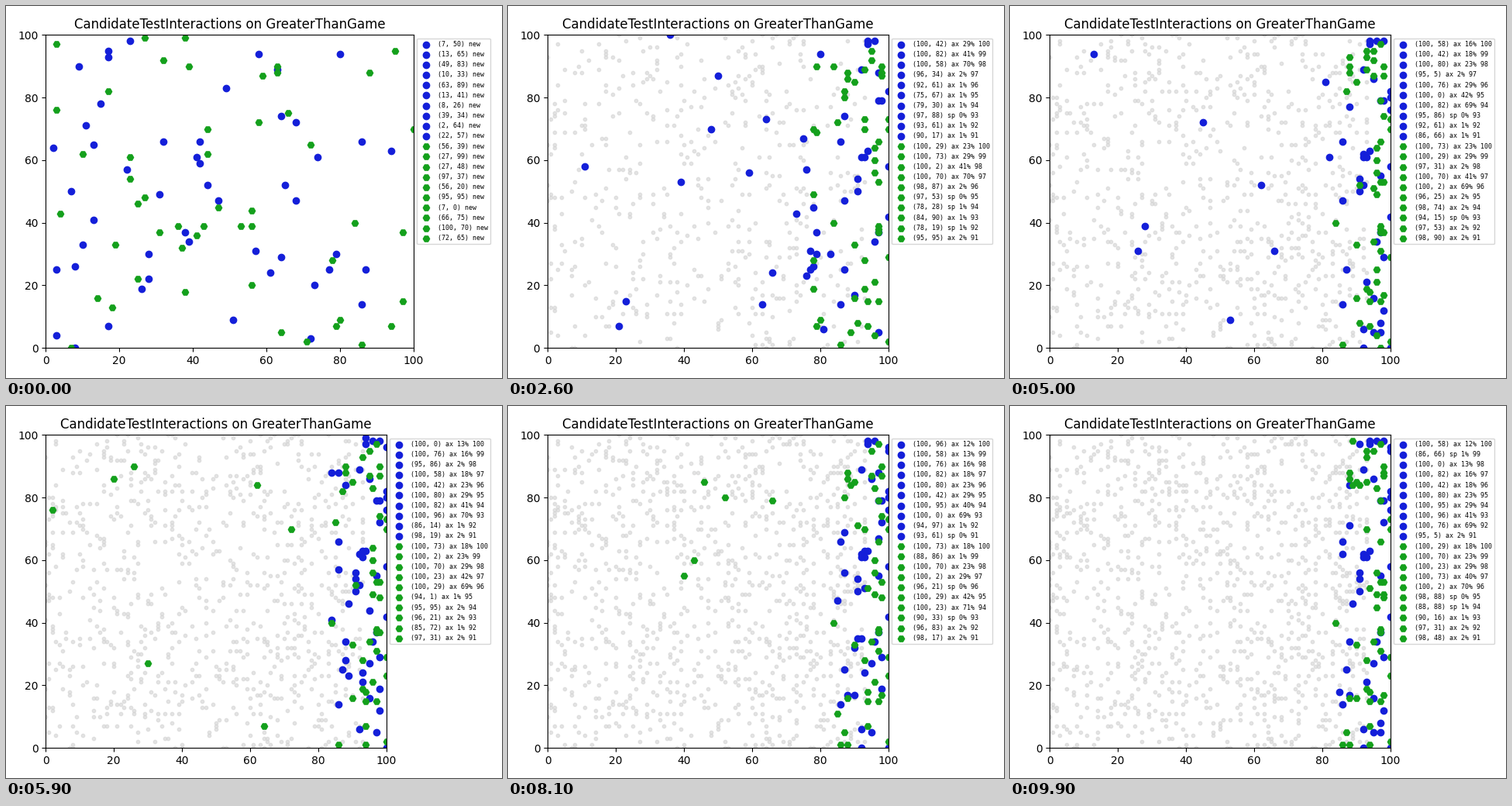
These frames come from a looping animation (640x480 px, 10000 ms). A matplotlib script:

```python
import numpy as np
import matplotlib.pyplot as plt
from matplotlib.animation import FuncAnimation

FRAMES, SIZE, TOP = 100, 50, 10
BLUE, GREEN = "#141fd9", "#14a01c"
SHARES = [12, 13, 16, 18, 23, 29, 41, 70]


def floor_x(t):
    """Lowest x that still survives selection."""
    return 84 * (1 - np.exp(-t / 12))


def explored(t):
    """How many random trials have been dropped so far."""
    return int(1300 * (1 - np.exp(-min(t, FRAMES - 1) / 75)))


def points(x, rng):
    """Pair whole x values with random heights."""
    return [(int(a), int(b)) for a, b in zip(x, rng.integers(0, 101, len(x)))]


def shuffled(items, rng):
    return [items[i] for i in rng.permutation(len(items))]


class Population:
    """Founders fade out while keepers, scouts and elites gather at the right."""

    def __init__(self, seed, first, elites):
        rng = np.random.default_rng(seed)
        self.seed, self.elites = seed, elites
        self.founders = first + points(rng.integers(0, 99, SIZE - TOP), rng)
        self.keepers = points(99 - 9 * rng.random(28) ** 1.7, rng)
        self.born = 85 * np.linspace(0, 1, 80) ** 1.5
        start = np.maximum(45, floor_x(self.born))
        self.scouts = points(start + (99 - start) * rng.random(80), rng)

    def at(self, t, trials):
        """Return shown points, dropped points and legend rows."""
        if t == 0:
            return self.founders, [], [f"{p} new" for p in self.founders[:TOP]]
        rng = np.random.default_rng([self.seed, t])
        low = floor_x(t)
        best = [(100, y) for y, born in self.elites if born <= t]
        kept = self.keepers[:int(len(self.keepers) * min(1, t / 45))]
        kept = [p for p in kept if rng.random() < 0.85]
        alive = [p for p in self.founders if p[0] >= low and p not in best]
        scouts = [p for p, born in zip(self.scouts, self.born) if born <= t]
        fit = shuffled([p for p in scouts if p[0] >= low], rng)

        shown = best + kept + trials + alive
        shown += fit[:max(0, SIZE - len(shown))]
        dropped = [p for p in self.founders + scouts if p[0] < 94]
        rest = sorted({p for p in shown if p[0] >= low} - set(best))
        return shown, dropped, self.rows(rng, best, rest)

    def rows(self, rng, best, rest):
        best, rest = shuffled(best, rng), shuffled(rest, rng)
        spare = TOP - len(best)

        def minor():
            x, y = rest.pop()
            if rng.random() < 0.75:
                return f"({x}, {y}) ax {1 + (x >= 95)}%"
            return f"({x}, {y}) sp {int(x < 90)}%"

        rows = []
        for p, share in zip(best, SHARES[len(SHARES) - len(best):]):
            if rows and spare and rng.random() < 0.2:
                rows.append(minor())
                spare -= 1
            if share > 40:
                share += rng.integers(-1, 2)
            rows.append(f"{p} ax {share}%")
        rows += [minor() for _ in range(spare)]
        return [f"{row} {100 - i}" for i, row in enumerate(rows)]


candidates = Population(
    3,
    [(7, 50), (13, 65), (49, 83), (10, 33), (63, 89),
     (13, 41), (8, 26), (39, 34), (2, 64), (22, 57)],
    list(zip([82, 58, 42, 0, 76, 80, 96, 95], range(10, 70, 8))))

tests = Population(
    8,
    [(56, 39), (27, 99), (27, 48), (97, 37), (56, 20),
     (95, 95), (7, 0), (66, 75), (100, 70), (72, 65)],
    list(zip([70, 2, 29, 73, 23], [0, 5, 8, 12, 58])))

rng = np.random.default_rng(21)
cloud = points(rng.integers(0, 94, 1000), rng)

fig, ax = plt.subplots(figsize=(6.4, 4.8), dpi=100)
past = ax.scatter([], [], s=10, c="lightgrey", alpha=0.6)
blue = ax.scatter([], [], s=36, c=BLUE, marker="o", linewidths=1)
green = ax.scatter([], [], s=36, c=GREEN, marker="H", linewidths=1)
ax.set(xlim=(0, 100), ylim=(0, 100),
       title="CandidateTestInteractions on GreaterThanGame")
legend = ax.legend([blue] * TOP + [green] * TOP, ["-"] * (2 * TOP),
                   loc="upper left", bbox_to_anchor=(1, 1),
                   prop={"family": "DejaVu Sans Mono", "size": 6})
edges = {}


def fit_layout(width):
    """Lay out once per legend width and reuse the result."""
    if width not in edges:
        fig.tight_layout()
        edges[width] = fig.subplotpars.right
    fig.subplots_adjust(right=edges[width])


def place(dots, spots):
    dots.set_offsets(np.array(sorted(spots), float).reshape(-1, 2))


def update(t):
    done = explored(t)
    batch = cloud[done:explored(t + 1)] if t else []
    # The two sides take turns to explore.
    left, old_left, rows_left = candidates.at(t, [] if t % 2 else batch)
    right, old_right, rows_right = tests.at(t, batch if t % 2 else [])
    place(past, set(cloud[:done] + old_left + old_right) - set(left + right))
    place(blue, set(left))
    place(green, set(right))
    rows = rows_left + rows_right
    for text, row in zip(legend.get_texts(), rows):
        text.set_text(row)
    fit_layout(max(map(len, rows)))
    return past, blue, green, legend


anim = FuncAnimation(fig, update, frames=FRAMES, interval=100,
                     repeat=True, repeat_delay=0, blit=False)
plt.show()
```
